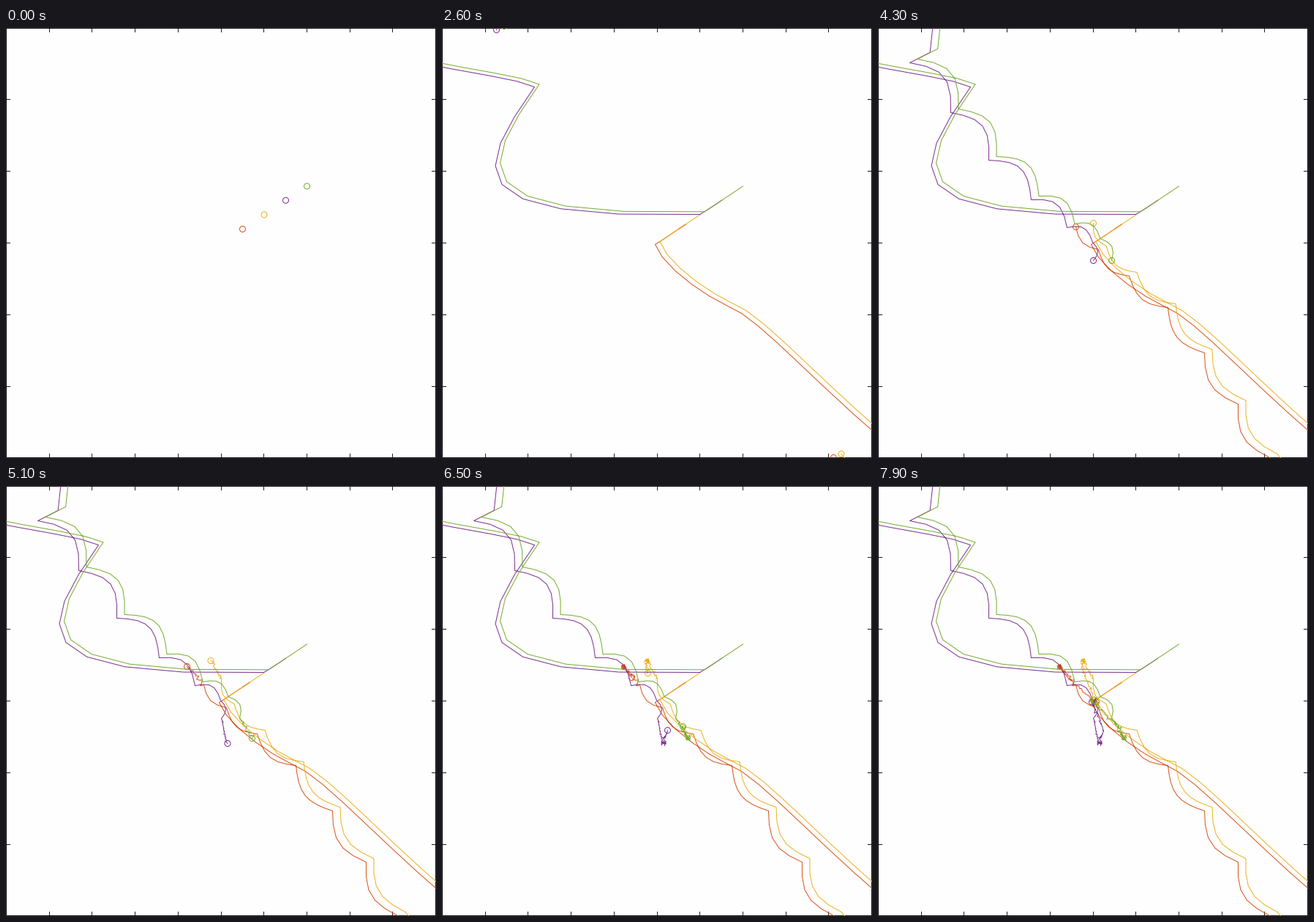
These frames come from a looping animation (588x587 px, 8 s). A matplotlib script:

```python
import numpy as np
import matplotlib.pyplot as plt
from matplotlib.animation import FuncAnimation

W, H, DPI = 588, 587, 64
FRAMES, INTERVAL = 80, 100
PX = 72 / DPI
AXIS = "#1e1e1e"
CENTER = np.array([295.0, 294.5])
T = np.arange(0, FRAMES, 0.5)  # two simulation steps per frame
rng = np.random.default_rng(4)

# The bodies travel in two pairs. Each pair leaves the stage along two
# Bezier curves and comes back in scallops between (time, x, y) cusps.
LOWER = dict(
    split=11.5,
    curves=[[(291, 295), (300, 322), (350, 360), (390, 379)],
            [(390, 379), (430, 393), (500, 475), (605, 564)]],
    cusps=[(25.5, 540, 592), (26, 535, 586), (28.5, 492, 513),
           (31, 446, 443), (35, 396, 381), (38, 343, 338), (41, 301, 302)],
    bulge=0.2,
)
UPPER = dict(
    split=13,
    curves=[[(352, 254), (13, 262), (45, 195), (126, 80)],
            [(126, 80), (100, 68), (50, 64), (-55, 42)]],
    cusps=[(25.5, 77, -6), (26, 74, 2), (27, 43, 47), (29.5, 99, 115),
           (32.5, 151, 180), (36, 209, 234), (38.5, 258, 272),
           (41, 293, 292)],
    bulge=0.27,
)

# colour, pair, follows?, start x, fall terms, then the places it passes
# after the pair splits up: past the centre, turning point, way home
BODIES = [
    ("#D95319", LOWER, 0, 323, (47, -57), (270, 271), (247, 246), (259, 261)),
    ("#EDB120", LOWER, 1, 352.5, (-29.5, 0), (294, 266), (279.5, 238), (281, 255)),
    ("#7E2F8E", UPPER, 0, 382, (-15.5, 0), (294, 317), (302.5, 351), (308, 333)),
    ("#77AC30", UPPER, 1, 411, (-34, 0), (319, 317), (336, 344), (329, 328)),
]


def span(start, end):
    """Mask of the steps from start to end, and their progress 0..1."""
    mask = (T >= start) & (T <= end)
    return mask, ((T[mask] - start) / (end - start))[:, None]


def bezier(u, points):
    a, b, c, d = np.array(points, float)
    v = 1 - u
    return a * v**3 + 3 * b * v**2 * u + 3 * c * v * u**2 + d * u**3


def scallop(u, a, b, bulge):
    a, chord = np.array(a), np.subtract(b, a)
    normal = np.array([chord[1], -chord[0]])
    return a + chord * u + bulge * normal * np.sin(np.pi * u)


def swarm(past, turn, late, phase):
    """Jittery drift to the turning point, back, and around the centre."""
    mask, _ = span(43, FRAMES)
    t = T[mask]
    stops = np.array([past, turn, turn, late, CENTER, CENTER])
    base = np.column_stack([np.interp(t, [43, 51, 58, 65, 74, 80], s)
                            for s in stops.T])
    noise = rng.uniform(-1, 1, (len(t), 2))
    blob = np.clip(np.minimum(t - 51, 61 - t) / 2, 0, 1)
    spike = np.sin(np.pi * t) * (1 - blob)
    home = np.clip((t - 70) / 4, 0, 1)
    angle = t - 79 + phase
    orbit = np.column_stack([np.cos(angle), np.sin(angle)])
    return mask, base + (3.5 * (blob + spike)[:, None] * noise
                         + 3 * home[:, None] * orbit)


def build(pair, follows, x0, fall, past, turn, late, phase):
    """One position per step; NaN while the body is off the stage."""
    track = np.full((len(T), 2), np.nan)

    mask, _ = span(0, 8.5)
    q = (T[mask] / 8) ** 2
    x = x0 + fall[0] * q + fall[1] * q**2
    track[mask] = np.column_stack([x, 293.3 - 0.665 * (x - 294)])

    gap = follows * np.array([6.5, -3.7])
    times = [9, pair["split"], 15]
    for start, end, curve in zip(times, times[1:], pair["curves"]):
        mask, u = span(start, end)
        track[mask] = bezier(u, curve) + gap

    gap = follows * np.array([10.5, -5])
    cusps = pair["cusps"]
    for (start, *a), (end, *b) in zip(cusps, cusps[1:]):
        mask, u = span(start, end)
        track[mask] = scallop(u, a, b, pair["bulge"]) + gap

    mask, u = span(41, 43)
    track[mask] = scallop(u, np.add(b, gap), past, pair["bulge"])
    mask, points = swarm(past, turn, late, phase)
    track[mask] = points
    return track


fig = plt.figure(figsize=(W / DPI, H / DPI), dpi=DPI, facecolor="#fefefe")
ax = fig.add_axes([0, 0, 1, 1])
ax.set_xlim(-0.5, W - 0.5)  # whole numbers are pixel centres
ax.set_ylim(H - 0.5, -0.5)
ax.axis("off")

right, bottom, tick = W - 1, H - 1, 5.5


def stroke(xs, ys):
    ax.plot(xs, ys, color=AXIS, lw=PX, solid_capstyle="butt",
            solid_joinstyle="miter", snap=False, zorder=1)


stroke([0, right, right, 0, 0, right], [0, 0, bottom, bottom, 0, 0])
for i in range(1, 10):
    x = round(58.7 * i)
    stroke([x, x], [0, tick])
    stroke([x, x], [bottom - tick, bottom])
for i in range(1, 6):
    y = round(97.9 * i - 0.5)
    stroke([0, tick], [y, y])
    stroke([right - tick, right], [y, y])

trails = []
for n, (color, *route) in enumerate(BODIES):
    line, = ax.plot([], [], color=color, lw=PX, snap=False, zorder=2 + n)
    ring = plt.Circle((0, 0), 4, fill=False, ec=color, lw=PX, snap=False,
                      zorder=2 + n)
    ax.add_patch(ring)
    trails.append((line, ring, build(*route, phase=n * np.pi / 2)))


def draw(frame):
    artists = []
    for line, ring, track in trails:
        path = track[:2 * frame + 1]
        line.set_data(path[:, 0], path[:, 1])
        visible = np.isfinite(path[-1]).all()
        ring.set_visible(visible)
        if visible:
            ring.center = tuple(path[-1])
        artists += [line, ring]
    return artists


anim = FuncAnimation(fig, draw, frames=FRAMES, interval=INTERVAL,
                     repeat=True, repeat_delay=0, blit=False)
plt.show()
```
